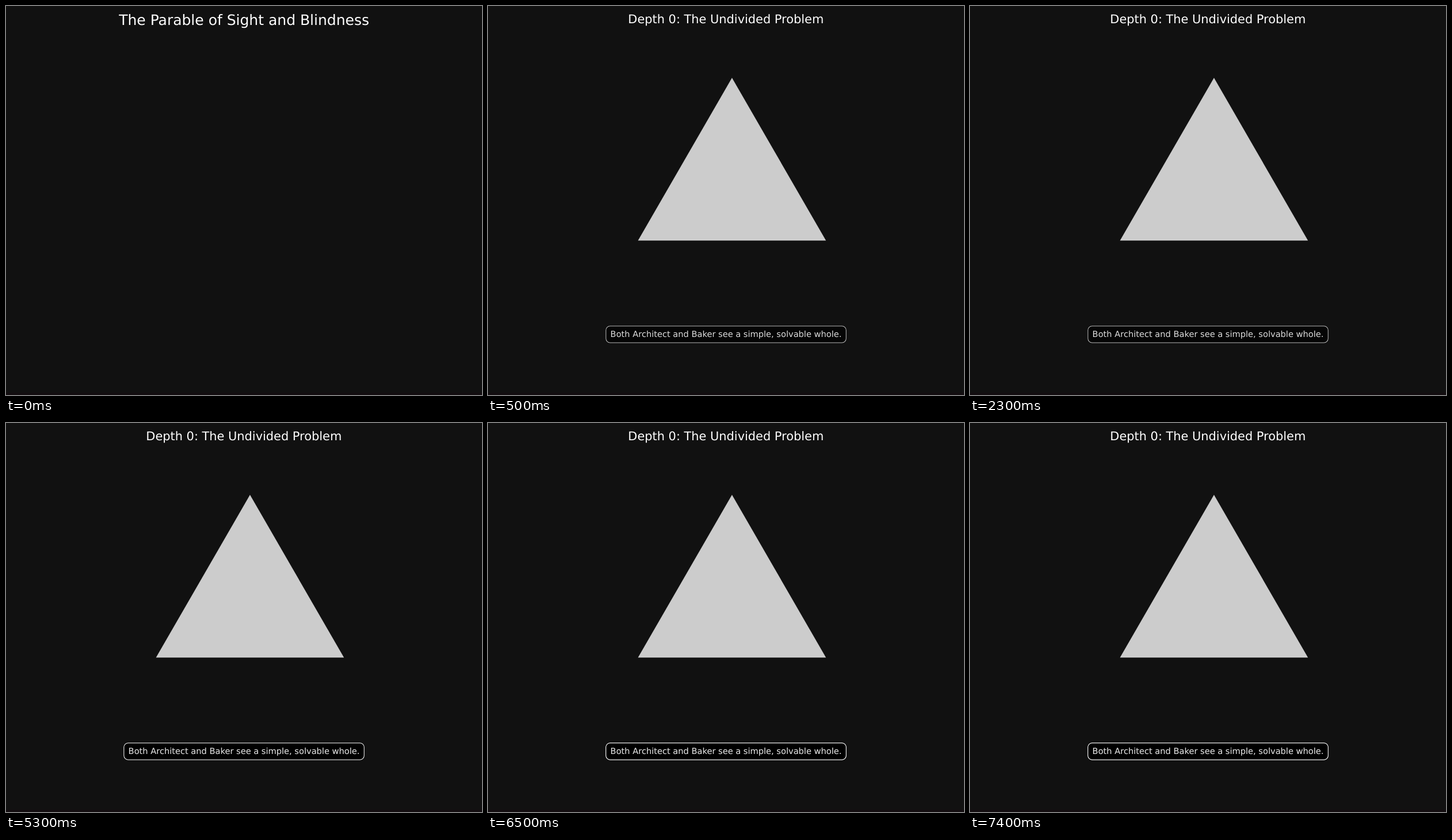
An HTML page that plays this animation: 827x677 px, repeating every 8 s.

```html
<!DOCTYPE html>
<html lang="en">
<head>
<meta charset="utf-8">
<title>Parable</title>
<style>
  html, body { margin: 0; width: 100%; height: 100%; overflow: hidden; background: #111; }
  svg { display: block; width: 827px; height: 677px; }
  text { font-family: "DejaVu Sans", sans-serif; text-anchor: middle; text-rendering: geometricPrecision; }
  .title { fill: #fff; }
  .note rect { fill: #000; fill-opacity: .7; stroke: #fff; stroke-opacity: .7; stroke-width: 1.05; }
  .note text { fill: #ddd; font-size: 14.62px; }
</style>
</head>
<body>
<svg viewBox="0 0 827 677">
  <defs>
    <g id="note" class="note">
      <rect x="204.9" y="556.9" width="417.3" height="29" rx="7.3"/>
      <text x="413.5" y="575.7">Both Architect and Baker see a simple, solvable whole.</text>
    </g>
  </defs>
  <rect width="827" height="677" fill="#111"/>
  <rect y="673" width="827" height="4" fill="#130d10"/>
  <text class="title" x="413.6" y="33.2" font-size="25" data-from="0" data-to="500">The Parable of Sight and Blindness</text>
  <g data-from="500" data-to="8000">
    <text class="title" x="413.3" y="30.2" font-size="20.9">Depth 0: The Undivided Problem</text>
    <path d="M423.9 125L587.2 408.3H260.6Z" fill="#ccc"/>
    <use href="#note"/>
  </g>
  <!-- each pass lays another translucent copy over the last -->
  <use href="#note" data-from="3500" data-to="8000"/>
  <use href="#note" data-from="6500" data-to="8000"/>
</svg>
<script>
  const LOOP = 8000;
  const parts = [...document.querySelectorAll("[data-from]")];
  const start = performance.now();

  function draw(now) {
    const t = Math.max(0, now - start) % LOOP;
    for (const part of parts) {
      const { from, to } = part.dataset;
      part.style.visibility = t >= +from && t < +to ? "visible" : "hidden";
    }
    requestAnimationFrame(draw);
  }
  draw(start);
</script>
</body>
</html>
```
